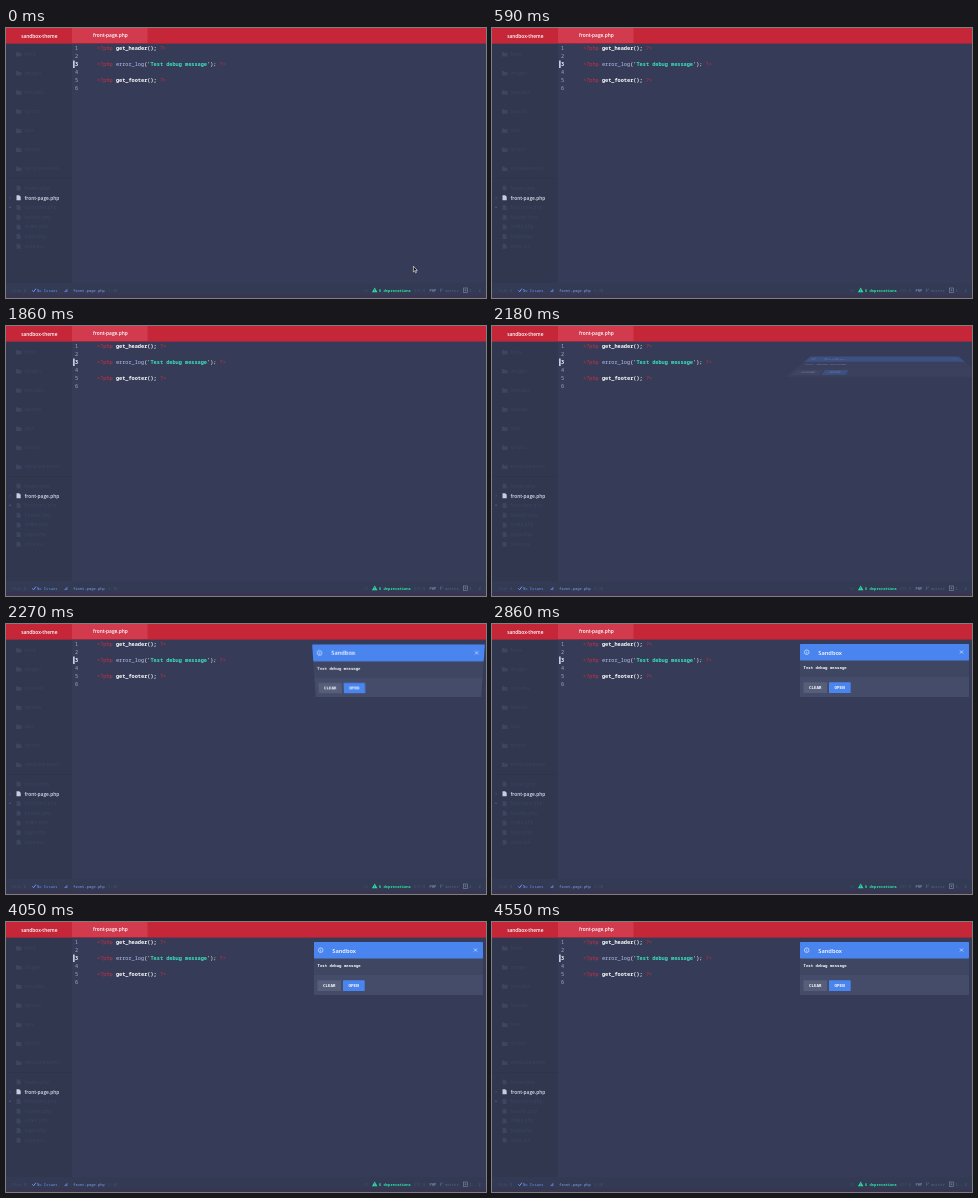
Recreate the animation shown at these times as an HTML page. Size 480 by 270 pixels, loop 4.6 s.

```html
<!DOCTYPE html>
<html lang="en">
<head>
<meta charset="utf-8">
<title>Editor notification</title>
<style>
html, body { margin: 0; width: 100%; height: 100%; overflow: hidden; background: #363c58; }
svg { display: block; }
#stage { position: absolute; left: 0; top: 0; }
#notice { position: absolute; left: 308px; top: 20px; width: 169px; height: 53px; }
#notice svg { overflow: visible; }
text { white-space: pre; }
.ui { font: 600 4.8px "Open Sans", sans-serif; fill: #fff; }
.code { font: 500 5.24px "Noto Sans Mono", monospace; fill: #fff; }
.code .tag { fill: #cb2f43; }
.code .fn { font-weight: 700; }
.code .call { fill: #b4c0ee; }
.code .str { fill: #3be0bd; font-weight: 600; }
.num { fill: #a0a8c4; }
.status { font: 500 3.8px "Noto Sans Mono", monospace; }
.faint { fill: #48506e; }
.blue { fill: #6d93f5; }
.green { fill: #2fe5a5; }
.label { font: 700 4px "Noto Sans Mono", monospace; fill: #fff; }
.button { font-size: 4.2px; }
</style>
</head>
<body>
<svg id="stage" width="480" height="270">
  <rect width="480" height="270" fill="#363c58"/>
  <rect width="66" height="255" y="15" fill="#30374f"/>
  <rect width="480" height="15" fill="#c52638"/>
  <rect x="66" width="75.5" height="15" fill="#d23b4e"/>
  <rect y="15" width="480" height="1" fill="#8e2c43"/>
  <rect y="255" width="480" height="11.5" fill="#323a54"/>
  <rect y="266.5" width="480" height="3.5" fill="#393450"/>
  <text class="ui" x="15.2" y="9.7" font-weight="700">sandbox-theme</text>
  <text class="ui" x="87" y="9.2">front-page.php</text>

  <g id="tree"></g>
  <text class="ui" x="18.5" y="171.6" style="fill:#d7dcec">front-page.php</text>

  <rect x="67" y="32.5" width="1.7" height="7.5" fill="#c3cbe6"/>
  <g id="numbers" class="code"></g>
  <g class="code">
    <text x="91" y="22.1"><tspan class="tag">&lt;?php</tspan> <tspan class="fn">get_header();</tspan> <tspan class="tag">?&gt;</tspan></text>
    <text x="91" y="38.1"><tspan class="tag">&lt;?php</tspan> <tspan class="call">error_log</tspan>('<tspan class="str">Test debug message</tspan>'); <tspan class="tag">?&gt;</tspan></text>
    <text x="91" y="54.1"><tspan class="tag">&lt;?php</tspan> <tspan class="fn">get_footer();</tspan> <tspan class="tag">?&gt;</tspan></text>
  </g>

  <g class="status">
    <text class="faint" x="6.5" y="263.6">File 0</text>
    <path d="M26.3 262.3l1.3 1.5 2.3-3.2" fill="none" stroke="#6d93f5" stroke-width="1"/>
    <text class="blue" x="31" y="263.6">No Issues</text>
    <path d="M58 264h3.4v-3.5z" fill="#5875bd"/>
    <text x="67" y="263.6" fill="#83a0e8">front-page.php</text>
    <text class="faint" x="102" y="263.6">3:30</text>
    <text class="faint" x="358" y="263.6">LF</text>
    <path class="green" d="M368.7 259.6l2.7 4.7h-5.4z"/>
    <path d="M368.7 261.2v1.5M368.7 263.1v.6" stroke="#323a54" stroke-width=".6"/>
    <text class="green" x="373" y="263.6" font-weight="600">6 deprecations</text>
    <text class="faint" x="408" y="263.6">UTF-8</text>
    <text x="423.5" y="263.6" fill="#91a3d8">PHP</text>
    <path d="M434.5 260.3v3.7m2-3.4v1l-2 1" fill="none" stroke="#566285" stroke-width=".7"/>
    <text x="439" y="263.6" fill="#566285">master</text>
    <rect x="457.5" y="260" width="4" height="4.4" fill="none" stroke="#75819f" stroke-width=".7"/>
    <path d="M458.5 262.2h2m-1-1v2" stroke="#75819f" stroke-width=".6"/>
    <text x="463.5" y="263.6" fill="#566285">1.. 2</text>
  </g>

  <path id="pointer" d="M407.4 238.2v5.7l1.3-1.1.9 2 .9-.4-.9-2h1.7z" fill="#111" stroke="#fff" stroke-width=".6"/>
</svg>

<div id="notice">
  <svg width="169" height="53">
    <rect width="169" height="53" rx=".8" fill="#444c69"/>
    <rect y="16" width="169" height="17" fill="#3e4662"/>
    <rect width="169" height="16.5" rx=".8" fill="#4a85ef"/>
    <circle cx="6.7" cy="8.2" r="2.3" fill="none" stroke="#d8e5ff" stroke-width=".7"/>
    <path d="M6.7 6.8v.6m0 .5v1.8" stroke="#d8e5ff" stroke-width=".7"/>
    <text class="ui" x="18.3" y="10.5" style="font-size:5.7px">Sandbox</text>
    <path d="M160 6.5l3 3m0-3l-3 3" stroke="#cfdefd" stroke-width=".8"/>
    <text class="label" x="3.5" y="24.9">Test debug message</text>
    <rect x="3.5" y="38.3" width="23.5" height="10.7" rx=".6" fill="#565e7a"/>
    <rect x="29" y="38.3" width="21.7" height="10.7" rx=".6" fill="#4a85ef"/>
    <text class="label button" x="9" y="45.2">CLEAR</text>
    <text class="label button" x="34.6" y="45.2">OPEN</text>
  </svg>
</div>

<script>
const LOOP = 4600, POINTER_END = 50, SHOW_AT = 2172, SHOW_TIME = 160;
const byId = id => document.getElementById(id);

const folder = (y, name) =>
  `<path d="M10 ${y - 2}h2l.6.8h3v3.7h-5.6z" fill="#3d4560"/>
   <text class="ui" x="18.5" y="${y + 1.6}" style="fill:#3a425c">${name}</text>`;
const file = (y, name, color) =>
  `<path d="M10.5 ${y - 2.4}h2.7l1.5 1.5v3.5h-4.2z" fill="${color}"/>
   <text class="ui" x="18.5" y="${y + 1.6}" style="fill:#3a425c">${name}</text>`;

byId('tree').innerHTML =
  ['fonts', 'images', 'includes', 'layouts', 'sass', 'scripts', 'template-parts']
    .map((name, i) => folder(26 + i * 19.1, name)).join('') +
  ['footer.php', '', 'functions.php', 'header.php', 'index.php', 'page.php', 'style.css']
    .map((name, i) => file(160 + i * 9.7, name, name ? '#3d4560' : '#c4cde4')).join('') +
  `<rect y="150" width="66" height=".6" fill="#2c334b"/>
   <circle cx="4" cy="179.3" r=".8" fill="#59627f"/>
   <path d="M3.5 168.8l1.2 1.2-1.2 1.2" fill="none" stroke="#525b79" stroke-width=".6"/>`;

byId('numbers').innerHTML = [1, 2, 3, 4, 5, 6].map(n =>
  `<text class="${n === 3 ? 'fn' : 'num'}" x="69" y="${14.1 + n * 8}">${n}</text>`).join('');

// cubic-bezier(.175, .885, .32, 1.275), solved by bisection
const bezier = (a, b, u) => 3 * a * u * (1 - u) ** 2 + 3 * b * u * u * (1 - u) + u ** 3;
function backOut(x) {
  if (x >= 1) return 1;
  let low = 0, high = 1;
  for (let i = 0; i < 24; i++) {
    const mid = (low + high) / 2;
    if (bezier(.175, .32, mid) < x) low = mid; else high = mid;
  }
  return bezier(.885, 1.275, low);
}

const start = performance.now();
function draw() {
  const t = (performance.now() - start) % LOOP;
  const p = backOut(Math.max(0, (t - SHOW_AT) / SHOW_TIME));
  const notice = byId('notice');
  byId('pointer').style.display = t < POINTER_END ? '' : 'none';
  notice.style.opacity = t < SHOW_AT ? 0 : Math.min(1, p);
  notice.style.transform = p === 1 ? 'none' :
    `perspective(169px) translateY(${-10 * (1 - p)}px) rotateX(${90 * (1 - p)}deg)`;
  requestAnimationFrame(draw);
}
draw();
</script>
</body>
</html>
```
